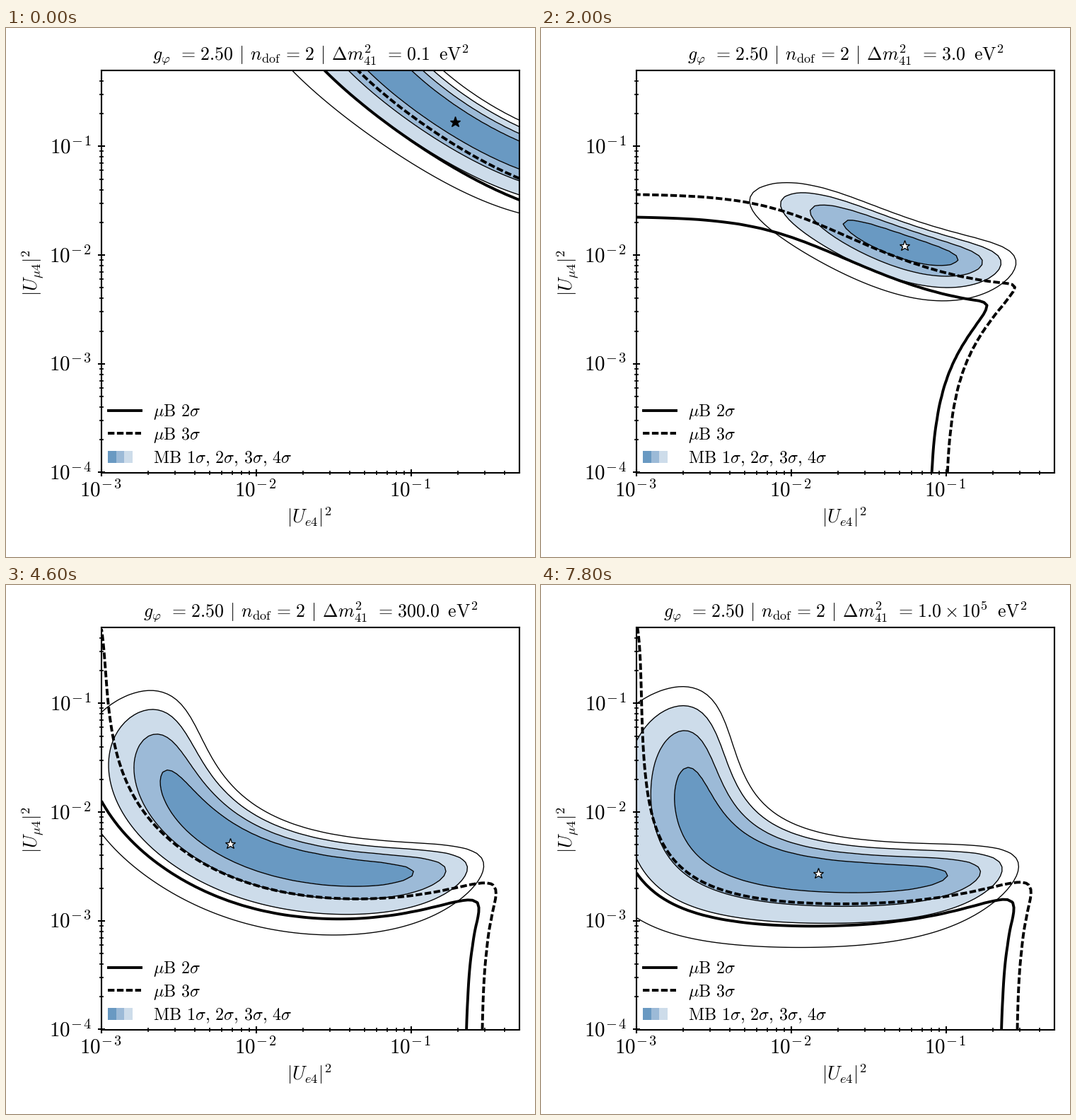
Write a matplotlib script that moves like this. It is 748 px wide and 748 px high and loops after 8000 ms.

```python
import numpy as np
import matplotlib.pyplot as plt
from matplotlib.animation import FuncAnimation
from matplotlib.patches import Rectangle

SIZE, DPI, FRAMES = 748, 100, 40
PT = 72 / DPI                      # points per pixel
LEFT, RIGHT, TOP, BOTTOM = 135, 726, 60, 628.5
XDEC, YDEC = 218.9, 153.7          # pixels per decade
BLUES = ["#6999c2", "#9cbad7", "#cddcea"]
SIGMAS = [2.30, 6.18, 11.83, 19.33]

# Model parameters at a few steps; geometric interpolation in between.
STEPS = [0, 6, 10, 17, 23, 31]
MODEL = {
    # signal strength
    "scale": [0.0275, 3.9e-4, 0.0051, 0.0042, 0.0023, 0.0023],
    "slow": [0.84, 2, 0.07, 0.02, 0.005, 2e-4],
    "mix": [0.85, 0.85, 0.3, 0.2, 0.85, 0.85],
    "floor": [1e-4, 0.0095, 0.001, 1e-4, 1e-5, 1e-5],
    # filled regions
    "err": [0.2, 0.2, 0.175, 0.195, 0.2, 0.205],
    "loss": [5, 0.4, 0.8, 0.8, 0.8, 0.8],
    "xmax": [5, 0.21, 0.062, 0.062, 0.067, 0.067],
    "ymax": [5, 0.038, 0.010, 0.0115, 0.011, 0.012],
    "power": [2, 2, 2, 1.2, 1.2, 1.2],
    # exclusion lines
    "reach": [0.39, 0.35, 0.48, 0.36, 0.33, 0.34],
    "tilt": [5, 0.16, 1.6, 9, 0.2, 0.2],
    "wall": [5, 0.402, 0.078, 0.199, 0.224, 0.224],
    "lean": [1, 0.9, 1.7, 0.38, 0.15, 0.15],
    "roof": [5, 0.1, 0.023, 0.021, 1, 1],
    # best fit
    "bestx": [0.1914, 0.0206, 0.0539, 0.0149, 0.0068, 0.0149],
    "besty": [0.1685, 0.0292, 0.0121, 0.0098, 0.0051, 0.0027],
}

plt.rcParams["mathtext.fontset"] = "cm"

px, py = np.meshgrid(np.linspace(LEFT, RIGHT, 90), np.linspace(TOP, BOTTOM, 90))
X = 10 ** (-3 + (px - LEFT) / XDEC)
Y = 10 ** (-4 + (BOTTOM - py) / YDEC)


def params(step):
    return {k: np.exp(np.interp(step, STEPS, np.log(v))) for k, v in MODEL.items()}


def signal(p):
    return (X + p["floor"]) * Y / (X + p["mix"] * Y + p["slow"]) / p["scale"]


def fit_chi2(p):
    s = signal(p)
    miss = s - X / p["loss"] - 1
    chi2 = (3 * miss ** 2 / (p["err"] ** 2 * (2 + s))
            + (X / p["xmax"]) ** 2 + (Y / p["ymax"]) ** p["power"])
    return chi2 - chi2.min()


def limit_chi2(p):
    u = signal(p) / p["reach"]
    excess = np.maximum(u - X / p["tilt"], 0)
    deficit = np.maximum(X / p["wall"] - p["lean"] * u, 0)
    return excess ** 2 + deficit ** 4 + (Y / p["roof"]) ** 2


fig = plt.figure(figsize=(SIZE / DPI, SIZE / DPI), dpi=DPI, facecolor="white")
ax = fig.add_axes([LEFT / SIZE, 1 - BOTTOM / SIZE, (RIGHT - LEFT) / SIZE, (BOTTOM - TOP) / SIZE])
ax.set(xlim=(LEFT, RIGHT), ylim=(BOTTOM, TOP))
ax.set_axisbelow(False)


def label(x, y, text, size, **kw):
    kw = {"ha": "center", "va": "baseline", **kw}
    return ax.text(x, y, f"${text}$", fontsize=size * PT, **kw)


# log axes
minor = np.add.outer(np.arange(4), np.log10(np.arange(2, 10))).ravel()
ax.set_xticks(LEFT + XDEC * np.arange(3), [""] * 3)
ax.set_yticks(BOTTOM - YDEC * np.arange(4), [""] * 4)
ax.set_xticks(LEFT + XDEC * minor[minor < 2.69], minor=True)
ax.set_yticks(BOTTOM - YDEC * minor[minor < 3.69], minor=True)
ax.tick_params(direction="inout", length=9.7 * PT, width=2.1 * PT)
ax.tick_params(which="minor", direction="inout", length=5.5 * PT, width=1.6 * PT)
for spine in ax.spines.values():
    spine.set_linewidth(2.1 * PT)

POWER = r"10^{-\hspace{0.15}%d}"
for k in range(3):
    label(LEFT - 1 + XDEC * k, 663, POWER % (3 - k), 29)
for k in range(4):
    label(121, BOTTOM - YDEC * k + 10, POWER % (4 - k), 29, ha="right")
label(428.5, 700, r"|U_{e4}|^2", 26.4)
label(46, 346, r"|U_{\mu 4}|^2", 26.4, rotation=90, rotation_mode="anchor")
title = label(430.5, 46, "", 25.9)

# legend
DASHES = (0, (2.4, 0.9))
THICK = 3.9 * PT
SP = r"\hspace{0.38}"
ax.plot([144.5, 190.5], [541, 541], color="black", linewidth=THICK)
ax.plot([144, 191], [573.5, 573.5], color="black", linewidth=THICK, linestyle=DASHES)
for k, c in enumerate(BLUES):
    ax.add_patch(Rectangle((144 + 11.7 * k, 598), 11.7, 17, facecolor=c, linewidth=0))
sigmas = r",\,".join(rf"{k}\sigma" for k in range(1, 5))
for y, text in [(549, rf"\mu\mathrm{{B}}{SP}2\sigma"), (582, rf"\mu\mathrm{{B}}{SP}3\sigma"),
                (615, rf"\mathrm{{MB}}{SP}{sigmas}")]:
    label(208, y, text, 24.2, ha="left")

star, = ax.plot([], [], "*", markersize=15.5 * PT, markeredgecolor="black",
                markeredgewidth=1.3 * PT, zorder=3)
contours = []


def heading(step):
    v = 10 ** (-1 + 6 * step / (FRAMES - 1))
    if v > 999:
        e = int(np.log10(v) + 1e-9)
        value = rf"{v / 10 ** e:.1f}\times 10^{{{e}}}"
    else:
        value = f"{float(f'{v:.0e}'):.1f}"
    bar = r"\hspace{0.4}|\hspace{0.4}"
    eq, wide = r"=\hspace{0.12}", r"\hspace{0.43}"
    return (rf"$g_{{\varphi}}{wide}{eq}2.50{bar}n_{{\mathrm{{dof}}}}\hspace{{0.12}}{eq}2{bar}"
            rf"\Delta m^2_{{41}}{wide}{eq}{value}\hspace{{0.55}}\mathrm{{eV}}^2$")


def draw(step):
    while contours:
        contours.pop().remove()
    p = params(step)
    fit, limit = fit_chi2(p), limit_chi2(p)
    contours.extend([
        ax.contourf(px, py, fit, [-1] + SIGMAS[:3], colors=BLUES, zorder=1),
        ax.contour(px, py, fit, SIGMAS, colors="black", linewidths=1.35 * PT, zorder=1.5),
        ax.contour(px, py, limit, [1, 2.6], colors="black", linewidths=THICK,
                   linestyles=["solid", DASHES], zorder=2),
    ])
    star.set_data([LEFT + XDEC * (np.log10(p["bestx"]) + 3)],
                  [BOTTOM - YDEC * (np.log10(p["besty"]) + 4)])
    star.set_markerfacecolor("white" if step else "black")
    title.set_text(heading(step))
    return [title, star, *contours]


anim = FuncAnimation(fig, draw, frames=FRAMES, interval=200, repeat=True, repeat_delay=0, blit=False)
plt.show()
```
